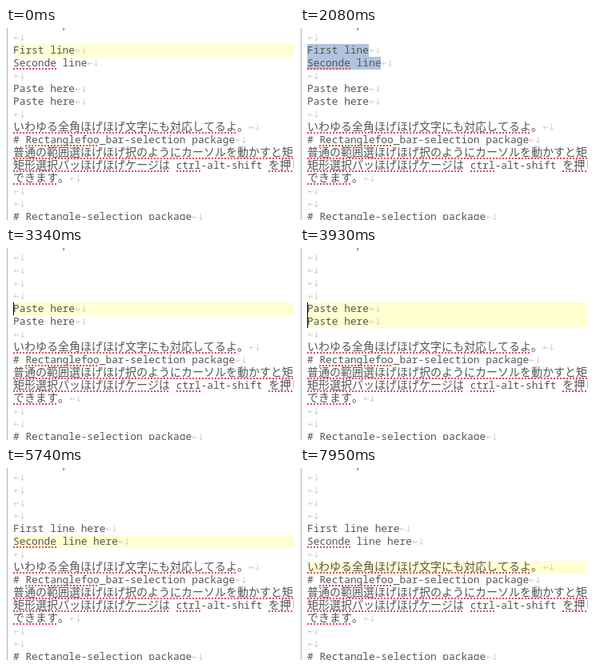
Recreate the animation shown at these times as an HTML page with a canvas. Size 360x240 px, loop 8000 ms.

```html
<!DOCTYPE html>
<html lang="ja">
<head>
<meta charset="utf-8">
<style>
html, body { margin: 0; width: 100%; height: 100%; overflow: hidden; background: #fff; }
canvas { display: block; }
</style>
</head>
<body>
<canvas id="stage" width="360" height="240"></canvas>
<script>
const ctx = document.getElementById('stage').getContext('2d');
const LOOP = 8000, LEFT = 9, LINE = 16, FIRST_Y = -12, LATIN = 7.697, WIDE = 14;
const LATIN_FONT = '12.83px "Noto Sans Mono", "DejaVu Sans Mono", monospace';
const WIDE_FONT = '14px "Noto Sans CJK JP", "Noto Sans CJK", sans-serif';

// Brackets enclose misspelled words, ¶ is the end-of-line mark.
const lines = [
  '        p', '¶', '', '', '¶', '', '', '¶',
  '[いわゆる全角ほげほげ文字にも対応してるよ]。¶',
  '# [Rectanglefoo]_bar-selection package¶',
  '[普通の範囲選ほげほげ択のようにカーソルを動かすと矩]',
  '[矩形選択パッほげほげケージは] [ctrl]-alt-shift [を押し]',
  '[できます]。¶', '¶', '¶',
  '# Rectangle-selection package¶'
];

// Times at which each gesture advances by one column or row
const select1 = [300, 560, 720, 860, 1000, 1120, 1280, 1430, 1560, 1690, 1820, 1950, 2080];
const select2 = [3930, 4080, 4200, 4330, 4460, 4600];
const goDown = [2950, 3220, 3340];
const goLeft = [6660, 6960, 7110, 7260, 7410, 7570];
const CUT = 2950, PASTE = 5340, SPELL = 5560, BLINK = 5740, DOWN1 = 5880, DOWN2 = 6290, END_BLINK = 7950;

const passed = (times, t) => times.filter(s => s <= t).length;
const rowY = row => FIRST_Y + row * LINE;

function rect(color, x, y, w, h) {
  ctx.fillStyle = color;
  ctx.fillRect(x, y, w, h);
}

function highlight(row) {
  rect('#ffffd2', LEFT, rowY(row), 360 - LEFT, LINE);
}

function cursor(row, x) {
  rect('#000', Math.round(x), rowY(row), 1, LINE);
}

function selectRows(row, cols, lengths) {
  lengths.forEach((length, i) => {
    if (cols) rect('#b0c4de', LEFT, rowY(row + i), Math.round(Math.min(cols, length) * LATIN), LINE);
    else highlight(row + i);
  });
}

// A left arrow followed by a down arrow
function eolMark(x, y) {
  ctx.strokeStyle = '#d2d2d2';
  ctx.lineWidth = 1;
  ctx.beginPath();
  ctx.moveTo(x + 7, y + 8.5);
  ctx.lineTo(x + 1, y + 8.5);
  ctx.moveTo(x + 3.5, y + 6.5);
  ctx.lineTo(x + 1, y + 8.5);
  ctx.lineTo(x + 3.5, y + 10.5);
  ctx.moveTo(x + 11.5, y + 4);
  ctx.lineTo(x + 11.5, y + 12);
  ctx.moveTo(x + 9.5, y + 9.5);
  ctx.lineTo(x + 11.5, y + 12);
  ctx.lineTo(x + 13.5, y + 9.5);
  ctx.stroke();
}

function dots(from, to, y) {
  for (let x = Math.round(from); x < to - 1; x += 4) rect('#e5485a', x, y + 14, 2, 2);
}

function drawLine(text, row) {
  const y = rowY(row);
  let x = LEFT, start = x;
  for (const ch of text) {
    if (ch === '[') start = x;
    else if (ch === ']') dots(start, x, y);
    else if (ch === '¶') eolMark(Math.round(x), y);
    else {
      const wide = ch > '\u2fff';
      ctx.font = wide ? WIDE_FONT : LATIN_FONT;
      ctx.fillStyle = '#555';
      ctx.fillText(ch, x, y + 12);
      x += wide ? WIDE : LATIN;
    }
  }
}

function drawCursors(t) {
  if (t < select1[0]) return;
  if (t < CUT) {
    if (t < select1[1]) [2, 3].forEach(r => cursor(r, LEFT));
  } else if (t < select2[0]) cursor(2 + passed(goDown, t), LEFT);
  else if (t < PASTE) {
    if (t < select2[1]) [5, 6].forEach(r => cursor(r, LEFT));
  } else if (t < DOWN1) {
    if (t < BLINK) cursor(6, LEFT + 12 * LATIN);
  } else if (t < DOWN2) cursor(7, LEFT);
  else if (t < END_BLINK) cursor(8, LEFT + WIDE * (12 - passed(goLeft, t)));
}

function drawBackground(t) {
  if (t < select1[0]) highlight(2);
  else if (t < CUT) selectRows(2, passed(select1, t) - 1, [10, 12]);
  else if (t < select2[0]) highlight(2 + passed(goDown, t));
  else if (t < PASTE) selectRows(5, passed(select2, t) - 1, [5, 5]);
  else highlight(t < DOWN1 ? 6 : t < DOWN2 ? 7 : 8);
}

function draw(t) {
  const cut = t >= CUT, pasted = t >= PASTE;
  lines[2] = cut ? '¶' : 'First line¶';
  lines[3] = cut ? '¶' : '[Seconde] line¶';
  lines[5] = pasted ? 'First line here¶' : 'Paste here¶';
  lines[6] = !pasted ? 'Paste here¶' : t < SPELL ? 'Seconde line here¶' : '[Seconde] line here¶';

  rect('#fff', 0, 0, 360, 240);
  rect('#b0b0b0', 1, 0, 1, 240);
  drawBackground(t);
  lines.forEach(drawLine);
  drawCursors(t);
}

function tick() {
  draw(performance.now() % LOOP);
  requestAnimationFrame(tick);
}
tick();
</script>
</body>
</html>
```
